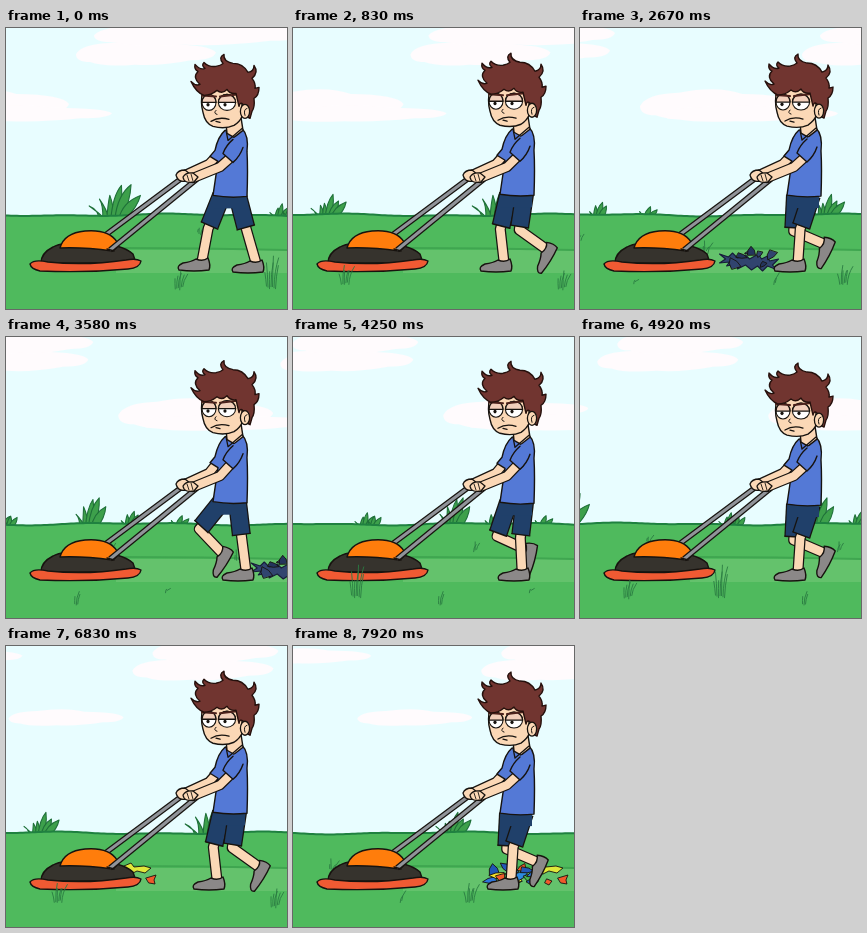
Recreate the animation shown at these times as an HTML page with a canvas. Size 281 by 281 pixels, loop 8000 ms.

```html
<!DOCTYPE html>
<html lang="en">
<head>
<meta charset="utf-8">
<title>Mowing the lawn</title>
<style>
html, body { margin: 0; width: 100%; height: 100%; overflow: hidden; background: #e8fdff; }
canvas { display: block; width: 100vw; height: 100vh; }
</style>
</head>
<body>
<canvas id="stage"></canvas>
<script>
const SIZE = 281, LOOP = 8000, FRAME = 1000 / 12;
const GROUND_STEP = 9.61, GROUND_LEN = 692, CLOUD_STEP = 4.75, WALK = 9;
const INK = '#17130f', SKIN = '#fbd8b6', NAVY = '#20406a', SHIRT = '#5479d6';

const canvas = document.getElementById('stage');
const ctx = canvas.getContext('2d');
const dpr = window.devicePixelRatio || 1;
canvas.width = canvas.height = SIZE * dpr;

function seeded(seed) {
  return () => (seed = (seed * 16807) % 2147483647) / 2147483647;
}

function shape(d, fill, line = INK, width = 1.4) {
  const p = new Path2D(d);
  if (fill) { ctx.fillStyle = fill; ctx.fill(p); }
  if (line) { ctx.strokeStyle = line; ctx.lineWidth = width; ctx.stroke(p); }
}

function oval(x, y, rx, ry, fill, line = INK, width = 1.3) {
  ctx.beginPath();
  ctx.ellipse(x, y, rx, ry, 0, 0, Math.PI * 2);
  ctx.fillStyle = fill;
  ctx.fill();
  if (line) { ctx.strokeStyle = line; ctx.lineWidth = width; ctx.stroke(); }
}

// A thick line with an ink edge on both sides.
function tube(points, width, fill, cap = 'butt') {
  ctx.lineCap = cap;
  for (const [w, c] of [[width + 2.5, INK], [width, fill]]) {
    ctx.beginPath();
    points.forEach(([x, y]) => ctx.lineTo(x, y));
    ctx.lineWidth = w;
    ctx.strokeStyle = c;
    ctx.stroke();
  }
  ctx.lineCap = 'round';
}

function at(x, y, draw) {
  ctx.save();
  ctx.translate(x, y);
  draw();
  ctx.restore();
}

function clipX(x0, x1, draw) {
  ctx.save();
  ctx.beginPath();
  ctx.rect(x0, 0, x1 - x0, SIZE);
  ctx.clip();
  draw();
  ctx.restore();
}

// Cloud streaks: left edge at the start, width, top, height
const streaks = [
  [70, 140, 12, 26], [88, 215, -6, 24],
  [-92, 155, 61, 31], [-70, 176, 77, 17],
  [-263, 141, 11, 24], [-243, 126, -6, 23],
  [-387, 115, 63, 17], [-500, 127, 2, 16]
];

function drawClouds(n) {
  for (const [x0, w, y, h] of streaks) {
    at(x0 + n * CLOUD_STEP, y, () => {
      shape(`M0 ${h * .55} Q${w * .04} ${h * .15} ${w * .25} ${h * .12} Q${w * .5} ${-h * .12} ${w * .66} ${h * .16}
        Q${w * .96} ${h * .18} ${w} ${h * .48} Q${w * .98} ${h * .78} ${w * .82} ${h * .78}
        Q${w * .6} ${h * 1.02} ${w * .42} ${h * .95} Q${w * .2} ${h * 1.05} ${w * .1} ${h * .85} Q0 ${h * .85} 0 ${h * .55}Z`, '#fffbfd', null);
    });
  }
}

function scroll(x0, n) {
  const x = (x0 + n * GROUND_STEP) % GROUND_LEN;
  return x > GROUND_LEN - 90 ? x - GROUND_LEN : x;
}

function blade(x, y, dx, h, w) {
  shape(`M${x - w / 2} ${y} Q${x + dx * .1 - w * .3} ${y - h * .7} ${x + dx} ${y - h} Q${x + dx * .6 + w * .7} ${y - h * .5} ${x + w / 2} ${y}Z`,
    '#3da04b', '#1f7039', 1.1);
}

// Ridge tufts: x at the start, height, width, blades
const tufts = [
  [106, 34, 46, 6], [272, 12, 18, 4], [629, 21, 32, 6], [361, 28, 26, 5],
  [401, 15, 16, 4], [450, 12, 14, 3], [281, 11, 10, 3]
];

function drawTufts(n) {
  for (const [x0, h, w, count] of tufts) {
    const x = scroll(x0, n), rnd = seeded(x0 * 31 + 7);
    for (let i = 0; i < count; i++) {
      const u = 2 * i / (count - 1) - 1;
      blade(x + u * w * .22, 191, u * w * .3 + 1 + rnd() * 4,
        h * (1 - .5 * Math.abs(u - .3)) * (.8 + rnd() * .3) + 3, 3 + h * .1);
    }
  }
}

// Loose lawn strokes: x at the start, base y, height, strokes
const strokes = [
  [173, 262, 22, 6], [265, 262, 34, 7], [193, 208, 13, 3], [510, 226, 14, 4], [579, 257, 13, 2],
  [648, 258, 22, 6], [349, 270, 20, 3], [439, 256, 7, 2], [384, 215, 14, 3]
];

function drawStrokes(n, front) {
  ctx.strokeStyle = '#2b7c42';
  ctx.lineWidth = .9;
  for (const [x0, y, h, count] of strokes) {
    if ((y > 246) !== front) continue;
    const x = scroll(x0, n), rnd = seeded(x0 * 17 + 3);
    for (let i = 0; i < count; i++) {
      const u = i - (count - 1) / 2, top = h * (.5 + rnd() * .5);
      ctx.beginPath();
      ctx.moveTo(x + u * 1.5, y - rnd() * 4);
      ctx.quadraticCurveTo(x + u * 1.7, y - top * .6, x + u * 2.4 + rnd() * 4, y - top);
      ctx.stroke();
    }
  }
}

function ridge(x, n) {
  const a = (x - n * GROUND_STEP) / GROUND_LEN * Math.PI * 2;
  return 187 + .9 * Math.sin(a * 3) + .6 * Math.sin(a * 7 + 1);
}

function drawGround(n) {
  let line = '';
  for (let x = -4; x <= SIZE + 4; x += 3) line += (line ? 'L' : 'M') + x + ' ' + ridge(x, n);
  shape(`${line}V${SIZE}H-4Z`, '#4fba5d', null);
  shape(line, null, '#1f8140', 2);
  ctx.fillStyle = '#64c26c';
  ctx.fillRect(110, 222, 171, 23);
  shape('M112 220 Q200 220 281 222', null, '#3fa650', 1.8);
}

function shreds(seed, count, x0, x1, colors) {
  const rnd = seeded(seed);
  for (let i = 0; i < count; i++) {
    const x = x0 + (x1 - x0) * (i + rnd()) / count, y = 221 + rnd() * 15;
    const r = 4 + rnd() * 5, turn = rnd() * 6;
    let d = '';
    for (let k = 0; k < 5; k++) {
      const a = turn + k * 1.257, s = r * (k % 2 ? .5 : 1);
      d += (k ? 'L' : 'M') + (x + Math.cos(a) * s) + ' ' + (y + Math.sin(a) * s * .7);
    }
    shape(d + 'Z', colors[i % colors.length], INK, .9);
  }
}

function drawRag(n) {
  const x = n * GROUND_STEP - 138;
  clipX(0, 62, () => at(x, 0, () => {
    shape('M-15 216 L-10 212 L-4 215 Q8 211 20 217 Q32 222 30 237 Q8 242 -10 238 Q-16 230 -11 220Z', '#222b4e');
    shape('M-4 216 Q4 226 0 236 M12 218 Q20 226 18 236', null, '#10152b', 1.1);
  }));
  clipX(100, SIZE, () => at(x, 2, () => {
    shape('M-30 224 L-21 227 L-17 223 L-12 228 L-4 225 L0 229 L9 224 L12 229 L18 226 L20 231 L29 229 L23 235 L28 240 L18 236 L13 241 L8 236 L2 240 L-4 235 L-12 239 L-13 234 L-23 236 L-20 232 L-30 233 L-24 229Z', '#31446f', '#161d38', 1.1);
    shreds(29, 7, -16, 24, ['#31446f', '#24345c']);
  }));
}

function drawToy(n) {
  const x = n * GROUND_STEP - 682;
  clipX(0, 60, () => at(x, 0, () => {
    oval(27, 229, 12, 8, '#f5e22d');
    shape('M15 231 Q27 226 38 231', null, '#3fa244', 2.5);
    oval(-10, 225, 31, 13, '#2d74d9');
    shape('M-20 214 Q2 207 21 217 L20 222 Q0 214 -20 219Z', '#f8d92c');
    shape('M-18 232 Q2 228 15 234 Q17 241 5 242 L-18 241Z', '#f0592b');
  }));
  clipX(105, SIZE, () => at(x, 0, () => {
    shreds(83, 17, -34, 16, ['#2d74d9', '#1f55b5', '#f5e22d', '#2d8be0', '#f0592b', '#2358b8', '#47b34f']);
    shape('M12 220 L19 217 L22 221 L32 220 L39 222 L33 227 L25 225 L19 228Z', '#dfe83a', INK, .9);
    shape('M34 232 L44 229 L42 234 L43 238 L37 237Z M23 233 L28 235 L25 239 L21 237Z', '#f0592b', INK, .9);
  }));
}

function drawMower() {
  tube([[98, 208], [180, 147]], 3, '#909399');
  shape('M35 235 Q35 225 47 219 Q56 214 84 214 Q116 216 127 226 L130 235Z', '#36332d');
  shape('M54 220 Q58 205 79 203 Q103 201 111 214 Q113 220 106 223 Q78 219 54 220Z', '#ff7d0c');
  shape('M24 236 Q28 231 42 234 Q80 238 120 232 Q130 230 135 233 Q134 240 122 241 Q80 245 34 243 Q25 241 24 236Z', '#f05a33');
  tube([[104, 222], [191, 151]], 3.1, '#909399');
  shape('M101 221 L108 223', null, INK, 1.4);
}

// Ankle x, ankle y and foot tilt in degrees for each step of the walk
const farLeg = [[196, 233, 0], [211, 234, 0], [228, 234, 0], [236, 234, 0], [243, 233, -12],
  [244, 216, -62], [234, 213, -75], [216, 216, -57], [207, 230, -18]];
const nearLeg = [[250, 235, 0], [253, 221, -58], [238, 213, -78], [219, 216, -58], [205, 231, -15],
  [218, 234, 0], [229, 234, 0], [240, 234, 0], [244, 234, 0]];

function drawLeg(hx, hy, [ax, ay, tilt]) {
  const dx = ax - hx, dy = ay - hy, d = Math.hypot(dx, dy);
  const bend = Math.sqrt(Math.max(0, 33 ** 2 - d * d / 4));
  const kx = hx + dx / 2 - dy / d * bend, ky = hy + dy / 2 + dx / d * bend;
  tube([[hx, hy], [kx, ky], [ax, ay]], 8.5, SKIN);
  at(ax, ay, () => {
    ctx.rotate(tilt * Math.PI / 180);
    shape('M-6 -2 Q1 1 6 -3 Q9 4 7 9 Q-8 11 -23 9 Q-26 5 -19 2 Q-11 1 -6 -2Z', '#8b8888');
  });
  const hemX = hx + (kx - hx) * .9, hemY = hy + (ky - hy) * .9;
  tube([[hx, hy - 3], [hemX, hemY]], 16.5, NAVY);
  const len = Math.hypot(kx - hx, ky - hy), px = (ky - hy) / len * 9, py = (hx - kx) / len * 9;
  shape(`M${hemX - px} ${hemY - py} L${hemX + px} ${hemY + py}`, null);
}

function drawLegs(p, bob) {
  drawLeg(215.5, 169 + bob, farLeg[p]);
  drawLeg(231.5, 169 + bob, nearLeg[p]);
  ctx.fillStyle = NAVY;
  ctx.fillRect(208, 162 + bob, 31, 17);
}

function drawHead() {
  shape('M220 94 L221 104 L228 108 L237 101 L235 88Z', SKIN);
  shape('M197 60 Q194 73 197 83 Q199 94 207 97 Q219 100 228 96 Q234 92 236 87 L236 60Z', SKIN);
  for (const [x, rx, px] of [[203, 7, 202], [221, 8.6, 219]]) {
    oval(x, 73, rx, 8, '#fff', INK, 1.1);
    ctx.beginPath();
    ctx.ellipse(x, 73, rx, 8, 0, Math.PI, Math.PI * 2);
    ctx.closePath();
    ctx.fillStyle = '#f2cfbb';
    ctx.fill();
    ctx.strokeStyle = INK;
    ctx.lineWidth = 1.3;
    ctx.stroke();
    oval(px, 75.3, 1.6, 1.8, INK, null);
  }
  shape('M196 66 L210 67 M214 67 L231 65', null, '#4b211b', 2);
  shape('M210 81 Q207 84 211 85', null, INK, 1);
  shape('M205 92 Q213 87 223 90 M210 92 L214 93', null, INK, 1.3);
  shape(`M198 66 Q190 63 185 52 Q190 57 194 55 Q186 48 192 42 Q188 40 189 35 Q194 41 199 39 Q195 36 198 33
    Q203 38 210 37 Q215 36 217 34 Q212 28 218 25 Q217 32 227 34 Q237 34 242 43 Q248 42 248 36 Q253 43 246 49
    Q250 54 249 59 L253 58 Q253 66 248 69 Q249 78 246 82 L244 89 L238 86 Q242 77 237 75 Q234 72 233 77
    L230 64 Q224 65 221 60 Q216 65 211 61 Q205 66 198 66Z`, '#713530', '#25100c', 1.4);
  oval(239, 82, 4.6, 7, SKIN);
  shape('M241 79 Q237 80 239 86', null, INK, 1);
}

function drawBody(bob) {
  // far arm
  tube([[216, 121 + bob], [203, 136], [177, 148]], 7.8, SKIN, 'round');
  at(0, bob, () => {
    shape('M219 101 Q212 107 209 121 L204 127 L212 132 L207 166 Q224 169 241 167 Q242 140 241 122 Q243 106 236 99Z', SHIRT);
    drawHead();
    shape('M220 101 L222 111 L236 99', null, INK, 1.3);
  });
  // near arm
  tube([[227, 126 + bob], [214, 139], [187, 150]], 8, SKIN, 'round');
  at(0, bob, () => {
    shape('M229 108 Q221 113 217 124 L227 133 Q234 127 238 117 L237 108Z', SHIRT, null);
    shape('M227 110 Q220 116 217 124 L227 133 Q234 127 237 118', null);
  });
  shape('M170 147 Q172 142 179 142 L184 146 L180 153 Q172 155 170 147Z', SKIN, INK, 1.3);
  shape('M177 149 Q180 144 187 145 L192 149 L188 154 Q178 156 177 149Z', SKIN, INK, 1.3);
  shape('M181 147 L183 153 M185 146 L187 153', null, INK, .9);
}

function draw(n) {
  const p = n % WALK, bob = 1.4 * Math.cos(4 * Math.PI * p / WALK);
  ctx.setTransform(canvas.width / SIZE, 0, 0, canvas.height / SIZE, 0, 0);
  ctx.lineJoin = ctx.lineCap = 'round';
  ctx.fillStyle = '#e8fdff';
  ctx.fillRect(0, 0, SIZE, SIZE);
  drawClouds(n);
  drawTufts(n);
  drawGround(n);
  drawStrokes(n, false);
  drawRag(n);
  drawToy(n);
  drawLegs(p, bob);
  drawMower();
  drawBody(bob);
  drawStrokes(n, true);
}

const start = performance.now();
function tick() {
  const t = Math.max(0, performance.now() - start) % LOOP;
  draw(Math.floor((t + 4) / FRAME) % 96);
  requestAnimationFrame(tick);
}
tick();
</script>
</body>
</html>
```
